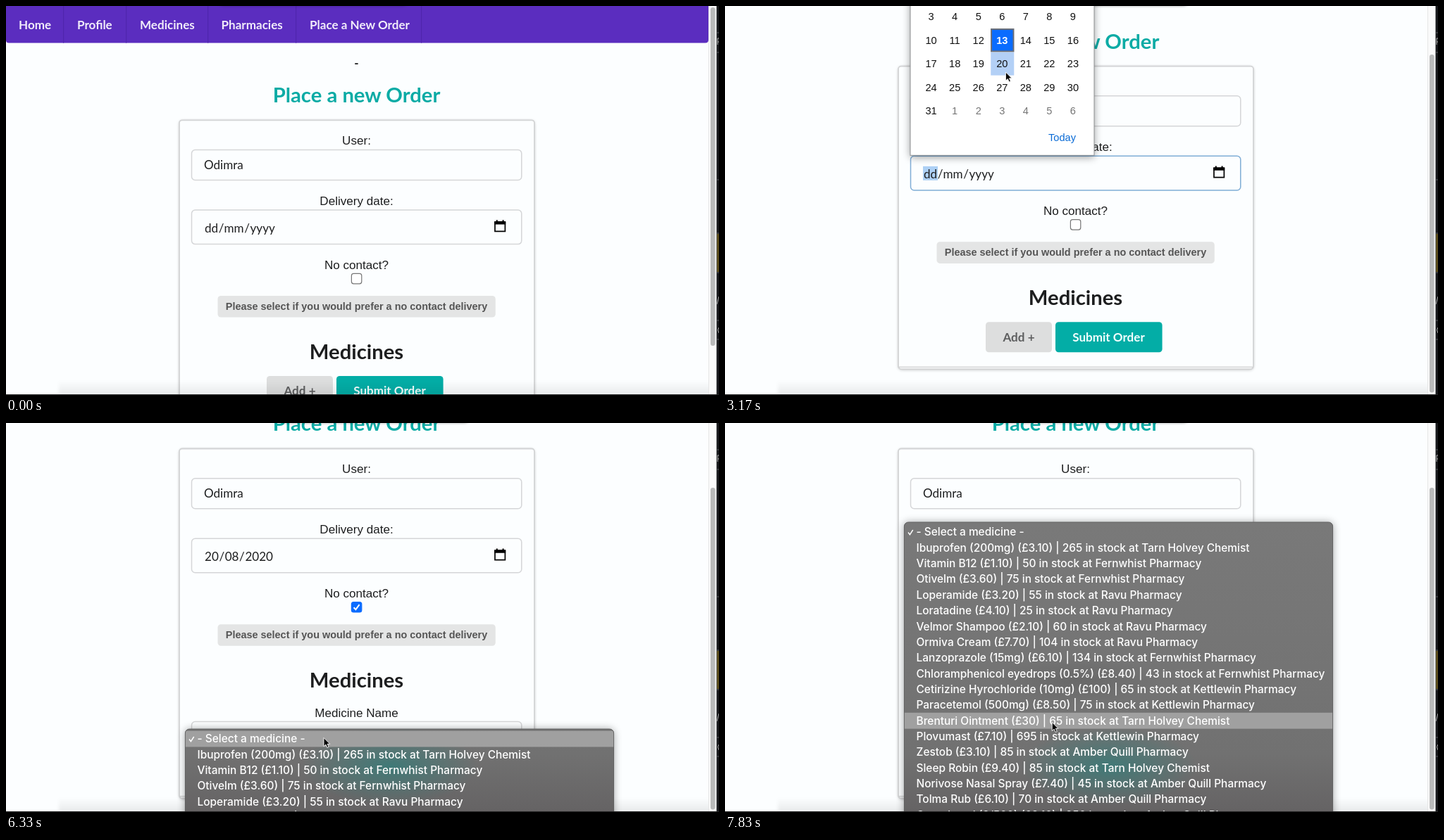
Write an HTML page that moves like this. It is 1012 px wide and 553 px high and loops after 8 s.

```html
<!DOCTYPE html>
<html lang="en">
<head>
<meta charset="utf-8">
<title>Place a new order</title>
<style>
  html, body { margin: 0; width: 100%; height: 100%; overflow: hidden; background: #fcfeff; }
  svg { display: block; width: 100vw; height: 100vh; }
  text { white-space: pre; }
  .lato { font: 17.07px Lato, sans-serif; fill: #1d1e1f; }
  .bold { font-weight: 700; }
  .heading { font-size: 29.26px; }
  .arial { font: 17.07px "Liberation Sans", Arial, sans-serif; fill: #1d1e1f; }
  .hint { font-size: 14.45px; font-weight: 700; fill: #555; }
  .day { font: 14.6px "Liberation Sans", Arial, sans-serif; fill: #111; }
  .menu { font: 500 15.45px Inter, sans-serif; fill: #fff; }
  .mid { text-anchor: middle; }
  .field { fill: #fcfeff; stroke: #d5d6d8; stroke-width: 1.5; }
</style>
</head>
<body>
<svg id="stage" viewBox="0 0 1012 553" preserveAspectRatio="none">
  <defs>
    <linearGradient id="menuFill" gradientUnits="userSpaceOnUse" x1="0" y1="141" x2="0" y2="553">
      <stop offset="0" stop-color="#797979"/>
      <stop offset=".8" stop-color="#717171"/>
      <stop offset="1" stop-color="#656364"/>
    </linearGradient>
    <linearGradient id="floor" x1="0" y1="0" x2="0" y2="1">
      <stop offset="0" stop-color="#000" stop-opacity="0"/>
      <stop offset="1" stop-color="#000" stop-opacity=".08"/>
    </linearGradient>
    <radialGradient id="teal">
      <stop offset="0" stop-color="#2f7d7a" stop-opacity=".75"/>
      <stop offset=".5" stop-color="#3b7a77" stop-opacity=".45"/>
      <stop offset="1" stop-color="#3b7a77" stop-opacity="0"/>
    </radialGradient>
    <radialGradient id="smudge">
      <stop offset="0" stop-color="#000" stop-opacity=".1"/>
      <stop offset="1" stop-color="#000" stop-opacity="0"/>
    </radialGradient>
    <filter id="soft" x="-20%" y="-60%" width="140%" height="220%"><feGaussianBlur stdDeviation="2.2"/></filter>
    <filter id="wide" x="-20%" y="-20%" width="140%" height="140%"><feGaussianBlur stdDeviation="6"/></filter>
    <clipPath id="menuClip"><rect id="menuShape" x="254" width="609" height="700" rx="6"/></clipPath>
  </defs>
  <rect width="1012" height="553" fill="#fcfeff"/>
  <g id="page"></g>
  <rect x="75" y="532" width="930" height="21" fill="url(#floor)" filter="url(#soft)"/>
  <g id="scrollbar">
    <rect x="997" width="11.5" height="553" fill="#fafafa"/>
    <rect x="997" width="1" height="553" fill="#e6e6e6"/>
    <rect id="thumb" x="1000" width="6.6" rx="3.3" fill="#b9baba"/>
    <rect x="1008.5" width="3.5" height="553" fill="#17181b"/>
    <rect x="1009" y="324" width="3" height="54" fill="#5a4c1c"/>
    <path d="M1009 38h3M1009 66h3M1009 247h3M1009 323h3M1009 379h3M1009 447h3M1009 474h3" stroke="#55565a"/>
    <path d="M1010 46v9M1010 46h2M1010 51h2M1012 413l-3 11M1012 457q-3 3 0 8" stroke="#aaa" fill="none"/>
  </g>
  <rect id="overhang" y="-16" width="268" height="15" rx="6" fill="#000" filter="url(#soft)"/>
  <g id="calendar"></g>
  <g id="menu"></g>
  <rect y="552" width="1012" height="1" fill="#222"/>
  <g id="cursor">
    <path id="arrow" d="M0 0V12.2L2.9 9.6L4.9 14L7 13L5.1 8.8H8.8Z" fill="#000" stroke="#fff" stroke-width=".9"/>
    <path id="hand" d="M-1 0C.4-1 1.5 0 1.9 1.2L3 4.4C4 3.4 5 3.6 5.5 4.4C6.5 3.8 7.4 4.2 7.8 5C9 4.8 9.6 5.5 9.9 6.7L10.4 10.5L9 15H2.6L-2.9 9.5C-3.5 8.2-2.2 7.4-.9 8.2L.3 9L-1.9 2C-2.1 1-1.8.4-1 0ZM4.1 9v4M6.1 9v4M8 9v4" fill="#fff" stroke="#222" stroke-width="1"/>
  </g>
</svg>
<script>
const $ = id => document.getElementById(id);
const text = (x, y, cls, str, extra = '') => `<text x="${x}" y="${y}" class="${cls}" ${extra}>${str}</text>`;
const box = (x, y, w, h, rx, attrs) => `<rect x="${x}" y="${y}" width="${w}" height="${h}" rx="${rx}" ${attrs}/>`;
const show = (id, on) => $(id).setAttribute('display', on ? 'inline' : 'none');
const set = (id, attrs) => { for (const k in attrs) $(id).setAttribute(k, attrs[k]); };
const move = (id, x, y) => set(id, { transform: `translate(${x} ${y})` });

const CENTER = 497.5, ADDED_HEIGHT = 66.5;

// The form, in page coordinates before any scrolling
const navItems = [['Home', 18, 81], ['Profile', 101, 170], ['Medicines', 190, 286],
  ['Pharmacies', 305.5, 411], ['Place a New Order', 431, 589]];

const dateText = parts => parts.map((p, i) => `<tspan ${i ? 'dx=".6"' : ''}>${p}</tspan>`).join('');

$('page').innerHTML =
  '<path d="M0 0H997V48Q997 52.5 992.5 52.5H4Q0 52.5 0 48.5Z" fill="#5b2dbf"/>' +
  navItems.map(([label, x, edge]) => text(x, 33.4, 'lato bold', label, 'style="fill:#f1ecfa"') +
    box(edge, 0, 1.2, 52.5, 0, 'fill="#4f25ad"')).join('') +
  text(CENTER, 87, 'lato bold mid', '-') +
  text(CENTER, 137.3, 'lato bold heading mid', 'Place a new Order', 'style="fill:#0caba5"') +
  '<g id="card">' +
    box(246, 163, 504, 431, 5, 'id="cardShadow" fill="#000" opacity=".25" filter="url(#soft)"') +
    box(246, 162.3, 504, 430.5, 4, 'id="cardEdge" fill="#fcfeff" stroke="#d3d4d5" stroke-width="1.8"') +
    box(247, 589.3, 502, 1.3, 0, 'id="cardLine" fill="#cfd0d1"') +
  '</g>' +
  text(CENTER, 197.3, 'arial mid', 'User:') +
  box(263.5, 204.5, 468.3, 43, 5, 'class="field"') +
  text(281, 232.2, 'lato', 'Odimra') +
  text(CENTER, 282.8, 'arial mid', 'Delivery date:') +
  box(263.5, 290, 468.3, 48.6, 5, 'id="dateBox" class="field"') +
  box(281, 304.5, 21, 20, 0, 'id="dayMark" fill="#add0f5"') +
  text(282, 322, 'lato', dateText(['dd', '/', 'mm', '/', 'yyyy']), 'id="dateEmpty"') +
  text(282, 322, 'lato', dateText(['20', '/', '08', '/', '2020']), 'id="dateFilled"') +
  '<path d="M694 307.5H708.4V320.4H694Z" fill="none" stroke="#000" stroke-width="1.7"/>' +
  '<path d="M693.2 306H709.2V310.5H693.2ZM695.8 304.3h2v2h-2zM704.6 304.3h2v2h-2z"/>' +
  text(CENTER, 373.8, 'arial mid', 'No contact?') +
  box(490.4, 380.4, 14.4, 14.4, 3, 'id="check" stroke-width="1.2"') +
  '<path id="tick" d="M493.6 388l2.8 3 5.2-7" fill="none" stroke="#fff" stroke-width="2"/>' +
  box(300.5, 412, 394.3, 30.6, 4.5, 'fill="#e4e5e5"') +
  text(CENTER, 432, 'arial hint mid', 'Please select if you would prefer a no contact delivery') +
  text(CENTER, 502, 'lato bold heading mid', 'Medicines') +
  '<g id="medicine">' +
    text(CENTER, 543.4, 'arial mid', 'Medicine Name') +
    box(263.5, 550.4, 468.3, 39, 5, 'class="field"') +
    text(281, 575.5, 'lato', '- Select a medicine -') +
  '</g><g id="buttons">' +
    box(370, 526, 94, 43, 4.5, 'id="addBox"') +
    text(417, 553.4, 'lato bold mid', 'Add +', 'id="addText"') +
    box(469, 526, 151.6, 43, 4.5, 'fill="#03ada6"') +
    text(544.5, 553.4, 'lato bold mid', 'Submit Order', 'style="fill:#f2fffe"') +
  '</g>';

// Date picker: August, five visible weeks starting with Monday the 3rd
const CELL = 33.55, TODAY = 10;
const cellX = i => 292.6 + (i % 7) * CELL;
const cellY = i => 15 + Math.floor(i / 7) * CELL;
let days = '';
for (let i = 0; i < 35; i++) {
  const day = i + 3, next = day > 31;
  const style = i === TODAY ? 'fill:#fff;font-weight:700' : next ? 'fill:#757575' : '';
  days += text(cellX(i), cellY(i) + 5.2, 'day mid', next ? day - 31 : day, `style="${style}"`);
}
$('calendar').innerHTML =
  box(263, -60, 261, 275, 0, 'fill="#000" opacity=".4" filter="url(#wide)"') +
  box(263, -60, 261, 272.3, 0, 'fill="#fff" stroke="#8d8f91" stroke-width="1"') +
  box(0, 0, 33, 33, 0, 'id="hoverDay" fill="#b3d0f6"') +
  box(cellX(TODAY) - 15.2, cellY(TODAY) - 15.6, 31.4, 31.4, 0, 'fill="#0a6cff" stroke="#6b6f78" stroke-width="2"') +
  days + text(459, 191.5, 'day', 'Today', 'style="fill:#0a6bd6"');

// Medicine list
const ROW = 22.35;
const shops = { t: 'Tarn Holvey Chemist', f: 'Fernwhist Pharmacy', r: 'Ravu Pharmacy',
  k: 'Kettlewin Pharmacy', a: 'Amber Quill Pharmacy' };
const medicines = [
  ['Ibuprofen (200mg)', '3.10', 265, 't'], ['Vitamin B12', '1.10', 50, 'f'],
  ['Otivelm', '3.60', 75, 'f'], ['Loperamide', '3.20', 55, 'r'],
  ['Loratadine', '4.10', 25, 'r'], ['Velmor Shampoo', '2.10', 60, 'r'],
  ['Ormiva Cream', '7.70', 104, 'r'], ['Lanzoprazole (15mg)', '6.10', 134, 'f'],
  ['Chloramphenicol eyedrops (0.5%)', '8.40', 43, 'f'],
  ['Cetirizine Hyrochloride (10mg)', '100', 65, 'k'], ['Paracetemol (500mg)', '8.50', 75, 'k'],
  ['Brenturi Ointment', '30', 65, 't'], ['Plovumast', '7.10', 695, 'k'],
  ['Zestob', '3.10', 85, 'a'], ['Sleep Robin', '9.40', 85, 't'],
  ['Norivose Nasal Spray', '7.40', 45, 'a'], ['Tolma Rub', '6.10', 70, 'a'],
  ['Cocodamol (8/500)', '2.10', 250, 'a']];
const rows = ['- Select a medicine -',
  ...medicines.map(([name, price, stock, shop]) => `${name} (£${price}) | ${stock} in stock at ${shops[shop]}`)];
$('menu').innerHTML =
  '<rect id="menuShadow" x="254" width="609" height="700" rx="6" opacity=".35" filter="url(#wide)"/>' +
  '<g clip-path="url(#menuClip)">' +
    '<rect x="254" width="609" height="553" fill="url(#menuFill)"/>' +
    '<ellipse cx="497" cy="366" rx="120" ry="34" fill="url(#smudge)"/>' +
    '<ellipse cx="545" cy="488" rx="125" ry="55" fill="url(#teal)"/>' +
    `<g id="menuRows">${box(254, 0, 609, ROW + .5, 0, 'id="hoverRow" fill="#a0a0a0"')}` +
      '<path d="M260 14.5l2.4 3.2 4.3-6.7" fill="none" stroke="#fff" stroke-width="1.4"/>' +
      rows.map((r, i) => text(271.5, 19.4 + i * ROW, 'menu', r)).join('') +
    '</g></g>' +
  '<rect id="menuRim" x="254.4" width="608.2" height="700" rx="6" fill="none" stroke="#5e5e5e" stroke-width=".9"/>';

// Keys are [time, ...values], eased from one to the next
function track(keys, t) {
  let i = 0;
  while (i < keys.length - 2 && t >= keys[i + 1][0]) i++;
  const [t0, ...from] = keys[i], [t1, ...to] = keys[i + 1];
  const u = Math.min(1, Math.max(0, (t - t0) / (t1 - t0))), e = u * u * (3 - 2 * u);
  return from.map((v, k) => v + (to[k] - v) * e);
}
const scrollKeys = [[330, 0, 2, 481, 302], [1400, 76.7, 69, 480.5, 389],
  [5660, 76.7, 69, 480.5, 389], [6000, 125.8, 92, 457.5, 389]];
const cursorKeys = [[1000, 600, 300], [1600, 709.3, 232], [2600, 709.3, 232], [3160, 398.4, 94],
  [3660, 398.4, 94], [4300, 497, 310], [4660, 497, 310], [5300, 440.5, 464.5], [5700, 440.5, 464.5],
  [6160, 451, 447.5], [6500, 451, 447.5], [6640, 454, 547], [6830, 455, 547], [7000, 456, 467],
  [7160, 459, 449], [7600, 464, 425.5], [7800, 464.2, 425.5]];
const menuKeys = [[6500, 435], [6980, 141]];

function draw(t) {
  const [scroll, thumbY, thumbH, overhangX] = track(scrollKeys, t);
  const [cx, cy] = track(cursorKeys, t);
  const [menuTop] = track(menuKeys, t);
  const picking = t >= 2490 && t < 3660, picked = t >= 3660;
  const checked = t >= 4490, added = t >= 5660, menuOpen = t >= 6160;
  const grow = added ? ADDED_HEIGHT : 0;

  move('page', 0, -scroll);
  set('thumb', { y: thumbY, height: thumbH });
  set('overhang', { x: overhangX, opacity: scroll > 40 ? .6 : .4 });

  set('cardShadow', { height: 431 + grow });
  set('cardEdge', { height: 430.5 + grow });
  move('cardLine', 0, grow);
  move('buttons', 0, grow);
  show('medicine', added);

  $('dateBox').style.stroke = t >= 2490 && !checked ? '#7fadd6' : '';
  show('dayMark', t >= 2490 && !checked);
  show('dateEmpty', !picked);
  show('dateFilled', picked);
  set('check', { fill: checked ? '#0a6cff' : '#fff', stroke: checked ? '#0a6cff' : '#767676' });
  show('tick', checked);

  const pageY = cy + scroll - grow;
  const overAdd = t > 4000 && cx > 370 && cx < 464 && pageY > 526 && pageY < 569;
  set('addBox', { fill: overAdd ? '#c2c3c6' : '#dddede' });
  $('addText').style.fill = overAdd ? '#2b2c2d' : '#5d5e5f';

  show('calendar', picking);
  const col = Math.floor((cx - 276) / CELL), line = Math.floor((cy + 1.7) / CELL);
  const cell = line * 7 + col, inGrid = col >= 0 && col < 7 && line >= 0 && line < 5;
  show('hoverDay', picking && inGrid);
  if (inGrid) set('hoverDay', { x: cellX(cell) - 16, y: cellY(cell) - 16.5 });

  show('menu', menuOpen);
  for (const id of ['menuShape', 'menuShadow', 'menuRim']) set(id, { y: menuTop });
  move('menuRows', 0, menuTop);
  // the highlight is one step ahead of the drawn pointer
  const aimY = track(cursorKeys, t + 167)[1];
  const row = Math.max(0, Math.floor((aimY - menuTop - 2.8) / ROW));
  set('hoverRow', { y: 2.6 + row * ROW });

  show('cursor', t >= 1160);
  move('cursor', cx, cy);
  show('arrow', !overAdd);
  show('hand', overAdd);
}

// Six pictures per second, 48 per loop
const STEP = 1000 / 6, LOOP = 8000, start = performance.now();
function tick() {
  const t = (performance.now() - start) % LOOP;
  draw(Math.floor((t + 5) / STEP) % 48 * STEP);
  requestAnimationFrame(tick);
}
tick();
</script>
</body>
</html>
```
